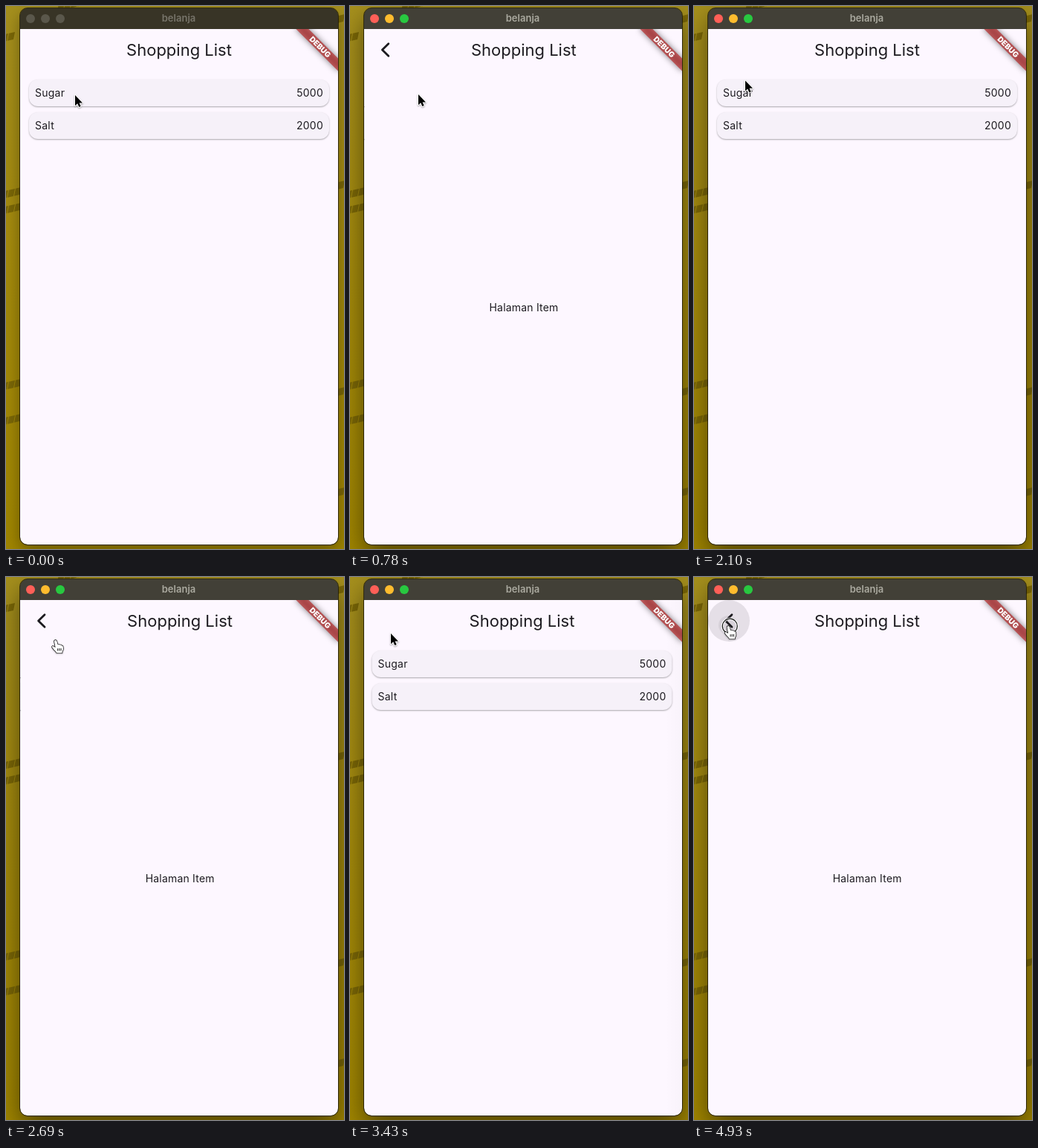
Recreate the animation shown at these times as an HTML page with a canvas. Size 455x731 px, loop 4.95 s.

```html
<!DOCTYPE html>
<html lang="en">
<head>
<meta charset="utf-8">
<title>Shopping List</title>
<style>
  html, body { margin: 0; width: 100%; height: 100%; overflow: hidden; background: #8d7709; }
  canvas { display: block; width: 455px; height: 731px; }
</style>
</head>
<body>
<canvas id="stage"></canvas>
<script>
const W = 455, H = 731, LOOP = 4950;
const WIN = { x: 19, y: 3, w: 428, h: 722, bar: 28 };
const TOP = WIN.y + WIN.bar, RIGHT = WIN.x + WIN.w;
const PAGE = '#fdf7ff', INK = '#1d1b20';
const FONT = 'Inter, "Open Sans", sans-serif';

const canvas = document.getElementById('stage');
const ratio = window.devicePixelRatio || 1;
canvas.width = W * ratio;
canvas.height = H * ratio;
const ctx = canvas.getContext('2d');

// The picture is held between these moments: [first, last, count].
const steps = [0];
for (const [a, b, n] of [[330, 1220, 7], [1510, 2550, 8], [2690, 3730, 8], [3880, 4630, 6], [4930, 4930, 1]])
  for (let i = 0; i < n; i++)
    steps.push(Math.round((a + (b - a) * i / Math.max(1, n - 1)) / 10) * 10);

// Pointer tip: [time, x, y]
const path = [
  [0, 93, 120], [330, 93, 120], [780, 92, 119], [930, 90, 116], [1220, 42, 65],
  [1660, 42, 65], [1960, 55, 85], [2260, 85, 118], [2400, 85, 118], [2550, 80, 110],
  [2690, 67, 86], [2840, 46, 67], [3140, 46, 67], [3430, 55, 76], [3730, 71, 110],
  [4330, 71, 110], [4480, 70, 106], [4630, 64, 91], [4930, 46.5, 67]
];
const presses = [330, 1510, 2260, 2990, 3880, 4930];
const handSpans = [[2200, 3200], [3700, 4170], [4900, LOOP]];
const hoverSpans = [[1200, 1800], [2800, 3200], [4600, LOOP]];
// Page changes: [start, 1 = open item page, 0 = go back]
const moves = [[320, 1], [1600, 0], [2240, 1], [3020, 0], [3920, 1]];
const MOVE_MS = 500;

const within = (spans, t) => spans.some(([a, b]) => t >= a && t < b);

function bezier(x1, y1, x2, y2) {
  const at = (a, b, u) => 3 * (1 - u) ** 2 * u * a + 3 * (1 - u) * u * u * b + u ** 3;
  return x => {
    if (x <= 0 || x >= 1) return x <= 0 ? 0 : 1;
    let lo = 0, hi = 1;
    for (let i = 0; i < 24; i++) {
      const mid = (lo + hi) / 2;
      if (at(x1, x2, mid) < x) lo = mid; else hi = mid;
    }
    return at(y1, y2, lo);
  };
}

const MX = 0.198, MY = 0.541;
const rise = bezier(0.056 / MX, 0.024 / MY, 0.108 / MX, 0.3085 / MY);
const settle = bezier((0.3655 - MX) / (1 - MX), 1, (0.5465 - MX) / (1 - MX), (0.989 - MY) / (1 - MY));
const slide = t => t < MX ? MY * rise(t / MX) : MY + (1 - MY) * settle((t - MX) / (1 - MX));
const underIn = bezier(0.35, 0.91, 0.33, 0.97);
const underOut = bezier(0.67, 0.03, 0.65, 0.09);

function pageOffsets(t) {
  let item = WIN.w, list = 0;
  for (const [start, open] of moves) {
    if (t < start) break;
    const p = Math.min(1, (t - start) / MOVE_MS);
    item = WIN.w * (open ? 1 - slide(p) : slide(p));
    list = -WIN.w / 3 * (open ? underIn(p) : underOut(1 - p));
  }
  return { item, list };
}

function pointerAt(t) {
  let i = path.findIndex(p => p[0] > t);
  if (i < 0) return path[path.length - 1].slice(1);
  const a = path[i - 1], b = path[i], k = (t - a[0]) / (b[0] - a[0]);
  return [a[1] + (b[1] - a[1]) * k, a[2] + (b[2] - a[2]) * k];
}

function text(str, x, y, size, { align = 'left', weight = 400, color = INK, gap = 0 } = {}) {
  ctx.font = `${weight} ${size}px ${FONT}`;
  ctx.letterSpacing = gap + 'px';
  ctx.textAlign = align;
  ctx.fillStyle = color;
  ctx.fillText(str, x, y);
}

function disc(x, y, r, color) {
  ctx.fillStyle = color;
  ctx.beginPath();
  ctx.arc(x, y, r, 0, 2 * Math.PI);
  ctx.fill();
}

function rounded(x, y, w, h, r) {
  ctx.beginPath();
  ctx.roundRect(x, y, w, h, r);
}

function shadow(color, blur, dy) {
  ctx.shadowColor = color;
  ctx.shadowBlur = blur * ratio;
  ctx.shadowOffsetY = dy * ratio;
}

function bricks(x, y, n) {
  ctx.save();
  ctx.translate(x, y);
  ctx.transform(1, -0.24, -0.2, 1, 0, 0);
  ctx.fillStyle = '#7b6706';
  for (let i = 0; i < n; i++) ctx.fillRect(i * 9, -5, 8, 10);
  ctx.restore();
}

function desktop(active) {
  const g = ctx.createLinearGradient(0, 0, 0, H);
  g.addColorStop(0, '#a58f1d');
  g.addColorStop(0.45, '#a48a0c');
  g.addColorStop(1, '#a08500');
  ctx.fillStyle = g;
  ctx.fillRect(0, 0, W, H);
  for (const y of [44, 255, 276, 513, 560]) bricks(-6, y, y < 100 ? 2 : 3);
  for (const y of [18, 242, 520, 655]) bricks(447, y, 2);
  bricks(70, 2, 5);
  ctx.save();
  shadow(active ? 'rgba(0,0,0,.5)' : 'rgba(0,0,0,.36)', active ? 34 : 22, active ? 14 : 8);
  ctx.fillStyle = '#2c2a1c';
  rounded(WIN.x, WIN.y, WIN.w, WIN.h, 10);
  ctx.fill();
  ctx.restore();
}

function titleBar(active) {
  ctx.fillStyle = active ? '#424037' : '#383426';
  ctx.fillRect(WIN.x, WIN.y, WIN.w, WIN.bar);
  const lights = active ? ['#ff5f57', '#febc2e', '#28c840'] : Array(3).fill('#5a574b');
  lights.forEach((c, i) => disc(33 + 20 * i, 17, 6, c));
  text('belanja', 232.5, 21, 13, { align: 'center', weight: 600, color: active ? '#aaa99f' : '#77746a' });
}

function heading() {
  text('Shopping List', 233, 67, 22, { align: 'center' });
}

function card(y, name, price) {
  ctx.save();
  shadow('rgba(0,0,0,.32)', 2, 1);
  ctx.fillStyle = '#f6f1f9';
  rounded(31, y, 404, 36, 12);
  ctx.fill();
  ctx.restore();
  text(name, 39, y + 23, 14, { gap: 0.25 });
  text(price, 427, y + 23, 14, { align: 'right', gap: 0.25 });
}

function listPage(dx) {
  ctx.save();
  ctx.translate(dx, 0);
  heading();
  card(99, 'Sugar', '5000');
  card(143, 'Salt', '2000');
  ctx.restore();
}

function itemPage(dx, hover, press) {
  if (dx >= WIN.w) return;
  ctx.save();
  ctx.translate(dx, 0);
  const edge = ctx.createLinearGradient(WIN.x - 21, 0, WIN.x, 0);
  edge.addColorStop(0, 'rgba(0,0,0,0)');
  edge.addColorStop(1, 'rgba(0,0,0,.016)');
  ctx.fillStyle = edge;
  ctx.fillRect(WIN.x - 21, TOP, 21, WIN.h);
  ctx.fillStyle = PAGE;
  ctx.fillRect(WIN.x, TOP, WIN.w, WIN.h);
  if (hover) disc(47, 59, 28, '#e5dfe7');
  if (press) disc(46, 65, 13, 'rgba(29,27,32,.07)');
  ctx.strokeStyle = INK;
  ctx.lineWidth = 2.8;
  ctx.lineCap = ctx.lineJoin = 'round';
  ctx.beginPath();
  ctx.moveTo(51, 50.7);
  ctx.lineTo(42.6, 59);
  ctx.lineTo(51, 67.3);
  ctx.stroke();
  heading();
  text('Halaman Item', 233.2, 411, 14, { align: 'center', gap: 0.2 });
  ctx.restore();
}

function banner() {
  ctx.save();
  ctx.translate(RIGHT, TOP);
  ctx.rotate(Math.PI / 4);
  ctx.filter = `blur(${4 * ratio}px)`;
  ctx.fillStyle = 'rgba(0,0,0,.5)';
  ctx.fillRect(-40, 28, 80, 12);
  ctx.filter = 'none';
  ctx.fillStyle = 'rgba(183,28,28,.627)';
  ctx.fillRect(-40, 28, 80, 12);
  text('DEBUG', 0, 37.7, 10.2, { align: 'center', weight: 900, color: '#fff' });
  ctx.restore();
}

const arrowShape = new Path2D('M0 0V14.2L3.2 11.2L5.3 16.1L7.7 15L5.6 10.4H10Z');
const handShape = new Path2D(
  'M-2 1Q-2.2-1 -.4-1Q1-1 1.5 .8L2.7 5Q4.6 4 5.4 5.6Q7 4.8 7.7 6.3Q9.4 5.9 9.8 7.8' +
  'L10 11Q9.8 13 8.6 14.4V16.2H1.3Q0 14-2.4 12L-5 8.6Q-5.3 6.4-3.2 7.2L-.4 9Z');
const knuckles = new Path2D('M2.6 10.2V13.4M4.8 10V13.4M7 10V13.4');

function pointer(x, y, hand, press) {
  ctx.save();
  ctx.translate(x, y);
  if (press) {
    ctx.beginPath();
    ctx.arc(1.8, -0.8, 10, 0, 2 * Math.PI);
    ctx.strokeStyle = '#fff';
    ctx.lineWidth = 3;
    ctx.stroke();
    ctx.strokeStyle = '#111';
    ctx.lineWidth = 1.2;
    ctx.stroke();
  }
  ctx.lineJoin = 'round';
  shadow('rgba(0,0,0,.35)', 2, 1);
  ctx.strokeStyle = hand ? '#000' : '#fff';
  ctx.fillStyle = hand ? '#fff' : '#000';
  ctx.lineWidth = hand ? 1.3 : 2;
  const shape = hand ? handShape : arrowShape;
  ctx.stroke(shape);
  ctx.shadowColor = 'transparent';
  ctx.fill(shape);
  if (hand) {
    ctx.lineWidth = 0.9;
    ctx.stroke(knuckles);
  }
  ctx.restore();
}

function draw(now) {
  const t = steps.filter(s => s <= now).pop();
  const active = t >= 330, press = presses.includes(t), hover = within(hoverSpans, t);
  const { item, list } = pageOffsets(t);
  ctx.setTransform(ratio, 0, 0, ratio, 0, 0);
  desktop(active);

  ctx.save();
  rounded(WIN.x, WIN.y, WIN.w, WIN.h, 10);
  ctx.clip();
  titleBar(active);
  ctx.beginPath();
  ctx.rect(WIN.x, TOP, WIN.w, WIN.h);
  ctx.clip();
  ctx.fillStyle = PAGE;
  ctx.fillRect(WIN.x, TOP, WIN.w, WIN.h);
  listPage(list);
  itemPage(item, hover, press && hover);
  banner();
  ctx.restore();

  ctx.strokeStyle = 'rgba(20,18,5,.75)';
  ctx.lineWidth = 1;
  rounded(WIN.x - 0.5, WIN.y - 0.5, WIN.w + 1, WIN.h + 1, 10.5);
  ctx.stroke();
  pointer(...pointerAt(t), within(handSpans, t), press);
}

let origin;
function tick(now) {
  origin ??= now;
  draw((now - origin) % LOOP);
  requestAnimationFrame(tick);
}
draw(0);
requestAnimationFrame(tick);
</script>
</body>
</html>
```
